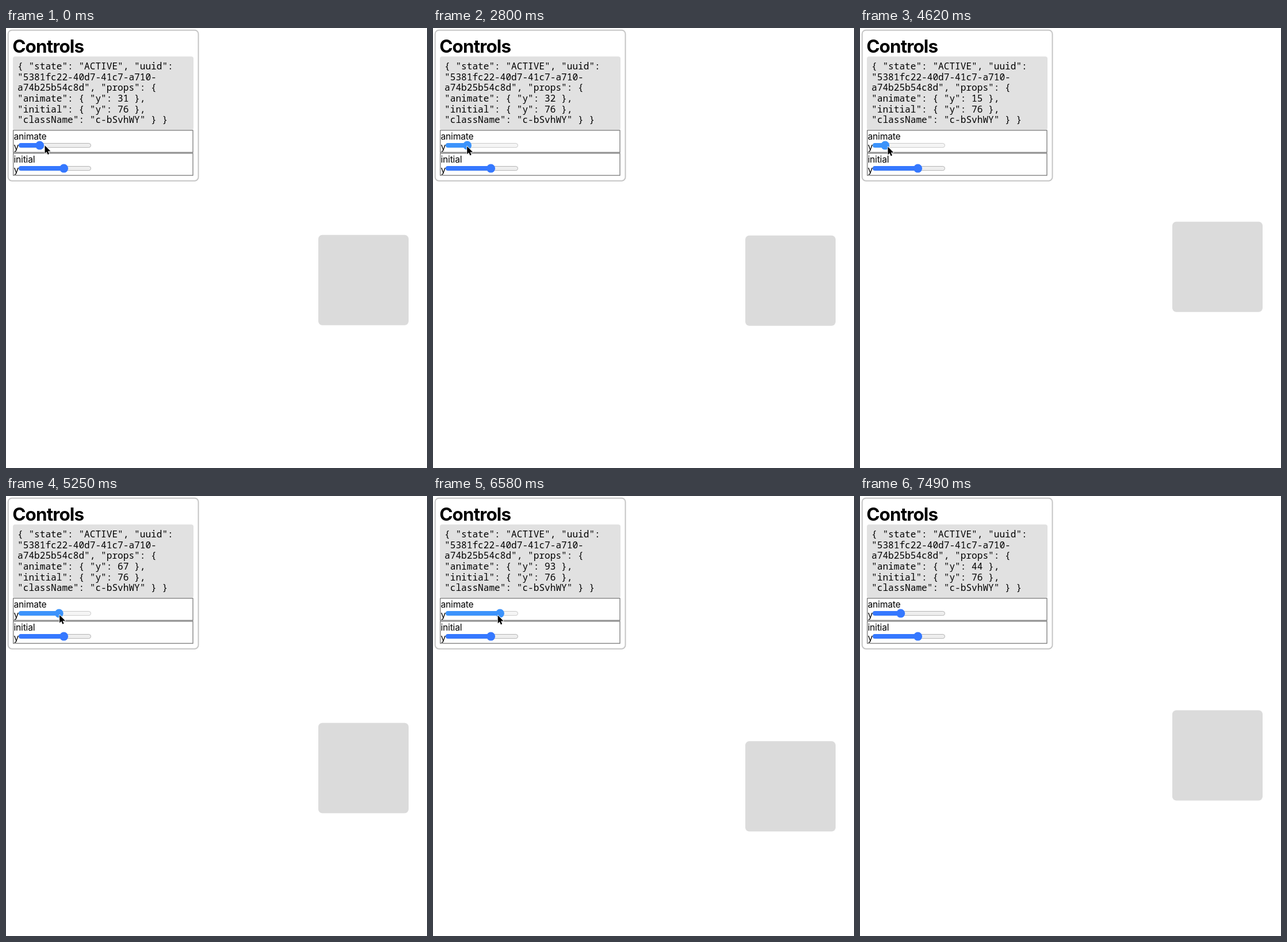
Recreate the animation shown at these times as an HTML page. Size 732x765 px, loop 7700 ms.

```html
<!DOCTYPE html>
<html lang="en">
<head>
<meta charset="utf-8">
<title>Controls</title>
<style>
html, body { margin: 0; width: 100%; height: 100%; overflow: hidden; background: #fff; }
svg { display: block; width: 732px; height: 765px; }
text { fill: #000; white-space: pre; }
.title { font: 700 31.4px Inter, sans-serif; letter-spacing: -.85px; font-variation-settings: "opsz" 14; }
.label { font: 400 15.7px Inter, sans-serif; letter-spacing: -.2px; font-variation-settings: "opsz" 14; }
.code { font: 400 16.12px "Noto Sans Mono", "DejaVu Sans Mono", monospace; fill: #222; }
.row { fill: #fff; stroke: #707070; stroke-width: 1.2; }
</style>
</head>
<body>
<svg viewBox="0 0 732 765">
  <rect id="square" x="543" width="157" height="157" rx="7" fill="#dbdbdb"/>
  <rect x="3.7" y="3.7" width="330.8" height="262" rx="6.5" fill="#fff" stroke="#c5c5c5" stroke-width="2"/>
  <text class="title" x="11.2" y="42.6">Controls</text>
  <rect x="12" y="49.5" width="314" height="128" rx="4" fill="#e1e1e1"/>
  <g id="code" class="code"></g>
  <g id="rows"></g>
  <path id="cursor" d="M0 0V13.8L3.1 10.9 5.2 15.8 7.5 14.8 5.4 10H9.9Z"
    fill="#000" stroke="#fff" stroke-width="1.6" stroke-linejoin="round" paint-order="stroke"/>
</svg>
<script>
const LOOP = 7700, STEP = 70;
const PRESS = 2310, RELEASE = 7350, LEAVE = 7490;
const LAG = 100;   // square trails the slider
const LEAD = 50;   // pointer runs ahead of the thumb
const INITIAL = 76;

const skins = {
  idle: { fill: "#3578ff", track: "#eeeeee", edge: "#b4b4b4" },
  hover: { fill: "#245fc8", track: "#e4e4e4", edge: "#a4a4a4" },
  active: { fill: "#3c93fb", track: "#f5f5f5", edge: "#cacaca" }
};

// Where the drag pauses or turns: time and slider value
const stops = [
  [PRESS, 31], [2780, 32], [3700, 6], [4400, 4],
  [5200, 67], [6100, 100], [6415, 100], [7150, 44]
];

const byId = id => document.getElementById(id);
const ease = p => (1 - Math.cos(Math.PI * p)) / 2;
const thumbX = value => 29.7 + .933 * value;

function set(el, attrs) {
  for (const key in attrs) el.setAttribute(key, attrs[key]);
}

function add(parent, tag, attrs, text = "") {
  const el = document.createElementNS("http://www.w3.org/2000/svg", tag);
  set(el, attrs);
  el.textContent = text;
  return parent.appendChild(el);
}

function valueAt(t) {
  const next = stops.findIndex(stop => stop[0] > t);
  if (next === 0) return stops[0][1];
  if (next < 0) return stops[stops.length - 1][1];
  const [t0, v0] = stops[next - 1], [t1, v1] = stops[next];
  return v0 + (v1 - v0) * ease((t - t0) / (t1 - t0));
}

function makeRow(name, top) {
  const rows = byId("rows"), y = top + 26.2;
  add(rows, "rect", { class: "row", x: 12.6, y: top, width: 312.4, height: 38.3 });
  add(rows, "text", { class: "label", x: 13.4, y: top + 15.8 }, name);
  add(rows, "text", { class: "label", x: 13.6, y: top + 34.2 }, "y");
  const track = add(rows, "rect", { x: 22.5, y: y - 3.6, width: 125, height: 7.2, rx: 3.6 });
  const fill = add(rows, "rect", { x: 22, y: y - 4, height: 8, rx: 4 });
  const thumb = add(rows, "circle", { cy: y, r: 7.5 });
  return (value, skin) => {
    const x = thumbX(value);
    set(track, { fill: skin.track, stroke: skin.edge });
    set(fill, { width: x - 22, fill: skin.fill });
    set(thumb, { cx: x, fill: skin.fill });
  };
}

const lines = [
  '{ "state": "ACTIVE", "uuid":',
  '"5381fc22-40d7-41c7-a710-',
  'a74b25b54c8d", "props": {',
  '',
  `"initial": { "y": ${INITIAL} },`,
  '"className": "c-bSvhWY" } }'
].map((line, i) => add(byId("code"), "text", { x: 20.1, y: 72.2 + 18.62 * i }, line));

const drawAnimate = makeRow("animate", 177.9);
const drawInitial = makeRow("initial", 217.9);
drawInitial(INITIAL, skins.idle);

function skinAt(t) {
  if (t < STEP || t >= LEAVE) return skins.idle;
  return t >= PRESS && t < RELEASE ? skins.active : skins.hover;
}

function cursorX(t) {
  const away = Math.max(0, 1 - (t / PRESS) ** 2);
  return thumbX(valueAt(t + LEAD)) + 8.9 * away;
}

function render(time) {
  const t = Math.floor(time % LOOP / STEP) * STEP;
  const value = Math.round(valueAt(t));

  lines[3].textContent = `"animate": { "y": ${value} },`;
  drawAnimate(value, skinAt(t));
  set(byId("square"), { y: 329.4 + .98 * valueAt(t - LAG) });
  set(byId("cursor"), {
    transform: `translate(${cursorX(t)} ${204.3 + t / 2000})`,
    visibility: t < LEAVE ? "visible" : "hidden"
  });
}

const start = performance.now();
function tick() {
  render(performance.now() - start);
  requestAnimationFrame(tick);
}
tick();
</script>
</body>
</html>
```
